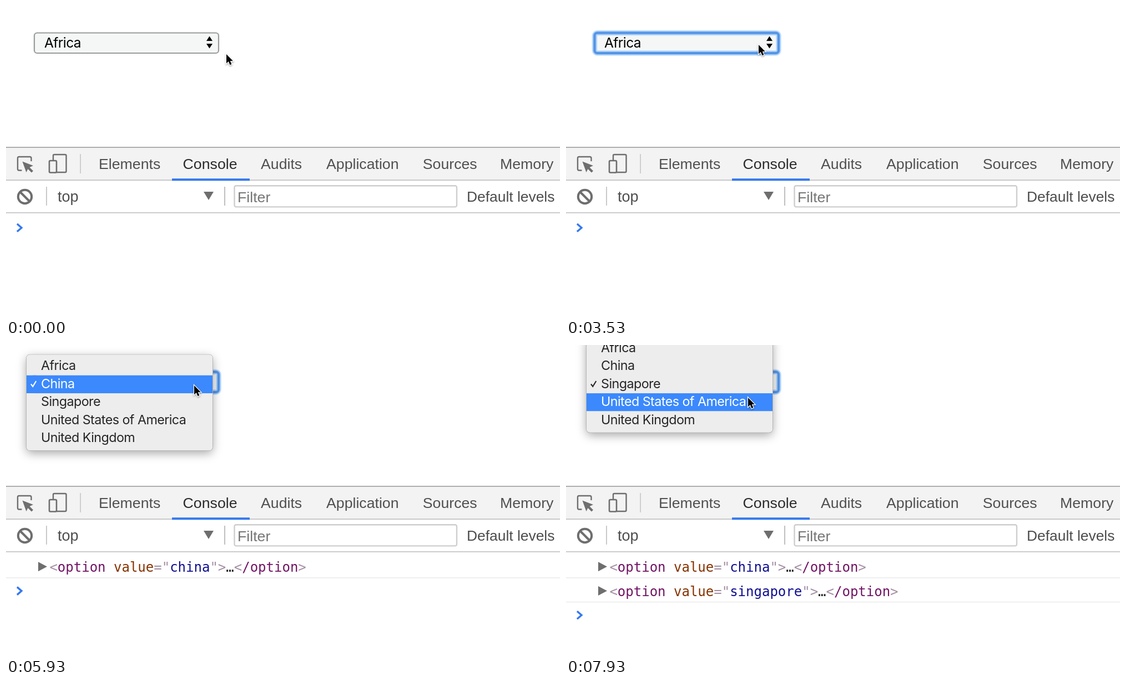
Recreate the animation shown at these times as an HTML page with a canvas. Size 998 by 561 pixels, loop 8 s.

```html
<!DOCTYPE html>
<html lang="en">
<head>
<meta charset="utf-8">
<title>Select and console</title>
<style>
  html, body { margin: 0; width: 100%; height: 100%; overflow: hidden; background: #fff; }
  canvas { display: block; width: 998px; height: 561px; }
</style>
</head>
<body>
<canvas id="stage" width="998" height="561"></canvas>
<script>
const ctx = document.getElementById('stage').getContext('2d');
const LOOP = 8000;
const ROW = 32.4;
const FADE = 190;
const SANS = '"Liberation Sans", sans-serif';
const UI = 'Inter, sans-serif';
const MONO = '"DejaVu Sans Mono", monospace';
const GREY = '#6e6e6e';
const BLUE = '#3478f0';

const options = ['Africa', 'China', 'Singapore', 'United States of America', 'United Kingdom'];

// Each menu: when it opens, when it starts to fade, and the checked option.
const menus = [
  { open: 900, close: 1400, checked: 0 },
  { open: 4680, close: 5260, checked: 0 },
  { open: 5930, close: 7060, checked: 1 },
  { open: 7640, close: 9000, checked: 2 }
];
const picks = [
  { at: 5460, option: 1 },
  { at: 7260, option: 2 }
];

// Pointer path: time, x, y
const path = [
  [0, 397, 87], [250, 397, 87], [800, 345, 65], [1070, 345, 63],
  [1500, 345, 63], [1900, 347, 70], [4720, 347, 70], [5200, 341, 113],
  [5500, 341, 113], [5860, 339, 73], [6020, 339, 73], [6400, 334, 110],
  [7200, 334, 110], [7580, 331, 71], [7720, 331, 71], [7930, 328, 95], [8000, 328, 95]
];

function pointerAt(t) {
  const i = Math.max(1, path.findIndex(p => p[0] > t));
  const [t0, x0, y0] = path[i - 1];
  const [t1, x1, y1] = path[i];
  const k = (t - t0) / (t1 - t0);
  const e = k * k * (3 - 2 * k);
  return { x: x0 + (x1 - x0) * e, y: y0 + (y1 - y0) * e };
}

function rect(x, y, w, h, color) {
  ctx.fillStyle = color;
  ctx.fillRect(x, y, w, h);
}

function round(x, y, w, h, r) {
  ctx.beginPath();
  ctx.roundRect(x, y, w, h, r);
}

function trace(points, close) {
  ctx.beginPath();
  points.forEach(([x, y]) => ctx.lineTo(x, y));
  if (close) ctx.closePath();
}

function poly(points, color) {
  trace(points, true);
  ctx.fillStyle = color;
  ctx.fill();
}

function stroke(color, width) {
  ctx.strokeStyle = color;
  ctx.lineWidth = width;
  ctx.stroke();
}

function text(str, x, y, font, color, spacing = 0) {
  ctx.font = font;
  ctx.letterSpacing = spacing + 'px';
  ctx.fillStyle = color;
  ctx.fillText(str, x, y);
}

function drawSelect(label, focused) {
  round(51, 48.5, 332, 36.5, 5);
  ctx.fillStyle = '#f5f7f7';
  ctx.fill();
  if (focused) {
    round(51.5, 48.5, 331.5, 36.5, 5);
    stroke('rgba(120,178,247,.3)', 10);
    stroke('rgba(120,178,247,.5)', 7.5);
    stroke('#5294e5', 4);
  } else {
    stroke('#999b9b', 2.2);
  }
  text(label, 69, 75, '24.5px ' + UI, '#000', -0.55);
  poly([[361, 63], [372, 63], [366.5, 54.5]], '#000');
  poly([[361, 68], [372, 68], [366.5, 76.5]], '#000');
}

function drawInspectIcon() {
  ctx.beginPath();
  ctx.moveTo(45.5, 280);
  ctx.arcTo(45.5, 272, 40, 272, 2.5);
  ctx.arcTo(21, 272, 21, 280, 2.5);
  ctx.arcTo(21, 296.5, 30, 296.5, 2.5);
  ctx.lineTo(28.5, 296.5);
  stroke(GREY, 2.4);
  poly([[29.5, 280.5], [49, 288], [42.5, 291], [49, 297.5], [46, 300.5], [39.5, 294], [36.5, 300]], GREY);
}

function drawDeviceIcon() {
  round(85, 268, 23.5, 32, 2);
  stroke(GREY, 2.4);
  round(78, 279, 13, 21.5, 2);
  ctx.fillStyle = '#f3f3f3';
  ctx.fill();
  stroke(GREY, 2.6);
}

function drawTools() {
  rect(0, 254, 998, 61, '#f3f3f3');
  rect(0, 254, 998, 1.8, '#a6a6a6');
  rect(0, 313, 998, 2.2, '#cbcbcb');
  rect(299, 311.2, 140, 4, BLUE);
  rect(133.2, 267, 1.8, 35, '#cacaca');
  drawInspectIcon();
  drawDeviceIcon();

  const tabs = [['Elements', 167], ['Console', 318.6], ['Audits', 459],
    ['Application', 577], ['Sources', 750.8], ['Memory', 890]];
  for (const [name, x] of tabs) {
    text(name, x, 294, '26.7px ' + SANS, name === 'Console' ? '#2b2b2b' : '#505050');
  }

  rect(0, 371.8, 998, 2.2, '#cfcfcf');
  rect(72, 326, 2, 34, '#cacaca');
  rect(393, 326, 2, 34, '#bfbfbf');
  ctx.beginPath();
  ctx.arc(34, 344, 12.2, 0, Math.PI * 2);
  stroke(GREY, 4);
  trace([[25.5, 335.5], [42.5, 352.5]]);
  stroke(GREY, 4);
  text('top', 93, 353, '27px ' + SANS, '#4c4c4c');
  poly([[356, 335], [374, 335], [365, 350]], GREY);
  round(411.5, 324.2, 400.5, 38.2, 3);
  stroke('#cecece', 2.4);
  text('Filter', 417, 354, '26.7px ' + SANS, '#757575');
  text('Default levels', 830, 353, '26.4px ' + SANS, '#4c4c4c');
}

function drawLog(value, y) {
  const soft = '#a58fa3', tag = '#701363', attr = '#853300', str = '#0f0f90';
  const parts = [['<', soft], ['option', tag], [' value', attr], ['="', soft], [value, str],
    ['"', soft], ['>', soft], ['…', '#222'], ['<', soft], ['/option', tag], ['>', soft]];
  poly([[58, y - 8.5], [58, y + 8.5], [74, y]], GREY);
  let x = 78.4;
  for (const [s, color] of parts) {
    text(s, x, y + 9.3, '24px ' + MONO, color);
    x += ctx.measureText(s).width;
  }
  rect(0, y + 19.2, 998, 2, '#efefef');
}

function drawConsole(logs) {
  logs.forEach((p, i) => drawLog(options[p.option].toLowerCase(), 399.8 + i * 43.6));
  const y = 400 + logs.length * 43.6;
  trace([[20, y - 7], [28, y], [20, y + 7]]);
  stroke(BLUE, 3.4);
}

function drawMenu(menu, alpha, pointerY) {
  const top = 50 - menu.checked * ROW;
  const rows = top + 4.7;
  const active = Math.floor((pointerY - rows) / ROW);

  // Outside shadow only, so that the fading panel stays clear.
  ctx.save();
  ctx.globalAlpha = alpha;
  ctx.beginPath();
  ctx.rect(0, 0, 998, 561);
  ctx.roundRect(37, top, 335, 172.3, 6);
  ctx.clip('evenodd');
  ctx.shadowColor = 'rgba(0,0,0,.36)';
  ctx.shadowBlur = 18;
  ctx.shadowOffsetY = 5;
  round(37, top, 335, 172.3, 6);
  ctx.fillStyle = '#ededed';
  ctx.fill();
  ctx.shadowColor = 'transparent';
  stroke('#b2b2b2', 1.8);
  ctx.restore();

  ctx.save();
  ctx.globalAlpha = alpha;
  round(37, top, 335, 172.3, 6);
  ctx.clip();
  if (active < 0 || active >= options.length) {
    rect(37, top, 335, 173, '#ededed');
  } else {
    const y = rows + active * ROW;
    rect(37, top, 335, y - top, '#ededed');
    rect(37, y, 335, ROW, '#3b89fd');
    rect(37, y + ROW, 335, top + 173 - y - ROW, '#ededed');
  }
  options.forEach((name, i) => {
    const y = rows + i * ROW;
    const color = i === active ? '#fff' : '#262626';
    text(name, 63, y + 23, '23.3px ' + UI, color, -0.55);
    if (i === menu.checked) {
      trace([[45, y + 15.8], [48.3, y + 20.2], [54.3, y + 10.3]]);
      stroke(color, 2.1);
    }
  });
  ctx.restore();
}

function drawPointer({ x, y }) {
  ctx.save();
  ctx.translate(x, y);
  trace([[0, 0], [0, 16.5], [3.8, 13], [6.5, 19.2], [9.4, 18], [6.8, 12], [11.8, 12]], true);
  ctx.shadowColor = 'rgba(0,0,0,.35)';
  ctx.shadowBlur = 3;
  ctx.shadowOffsetY = 1.5;
  stroke('#fff', 2.4);
  ctx.shadowColor = 'transparent';
  ctx.fillStyle = '#000';
  ctx.fill();
  ctx.restore();
}

function draw(t) {
  rect(0, 0, 998, 561, '#fff');
  const logs = picks.filter(p => t >= p.at);
  const chosen = logs.length ? logs[logs.length - 1].option : 0;
  const pointer = pointerAt(t);

  drawSelect(options[chosen], t >= menus[0].close);
  drawTools();
  drawConsole(logs);
  const menu = menus.find(m => t >= m.open && t < m.close + FADE);
  if (menu) drawMenu(menu, Math.min(1, 1 - (t - menu.close) / FADE), pointer.y);
  drawPointer(pointer);
}

function tick() {
  draw(performance.now() % LOOP);
  requestAnimationFrame(tick);
}
tick();
</script>
</body>
</html>
```
